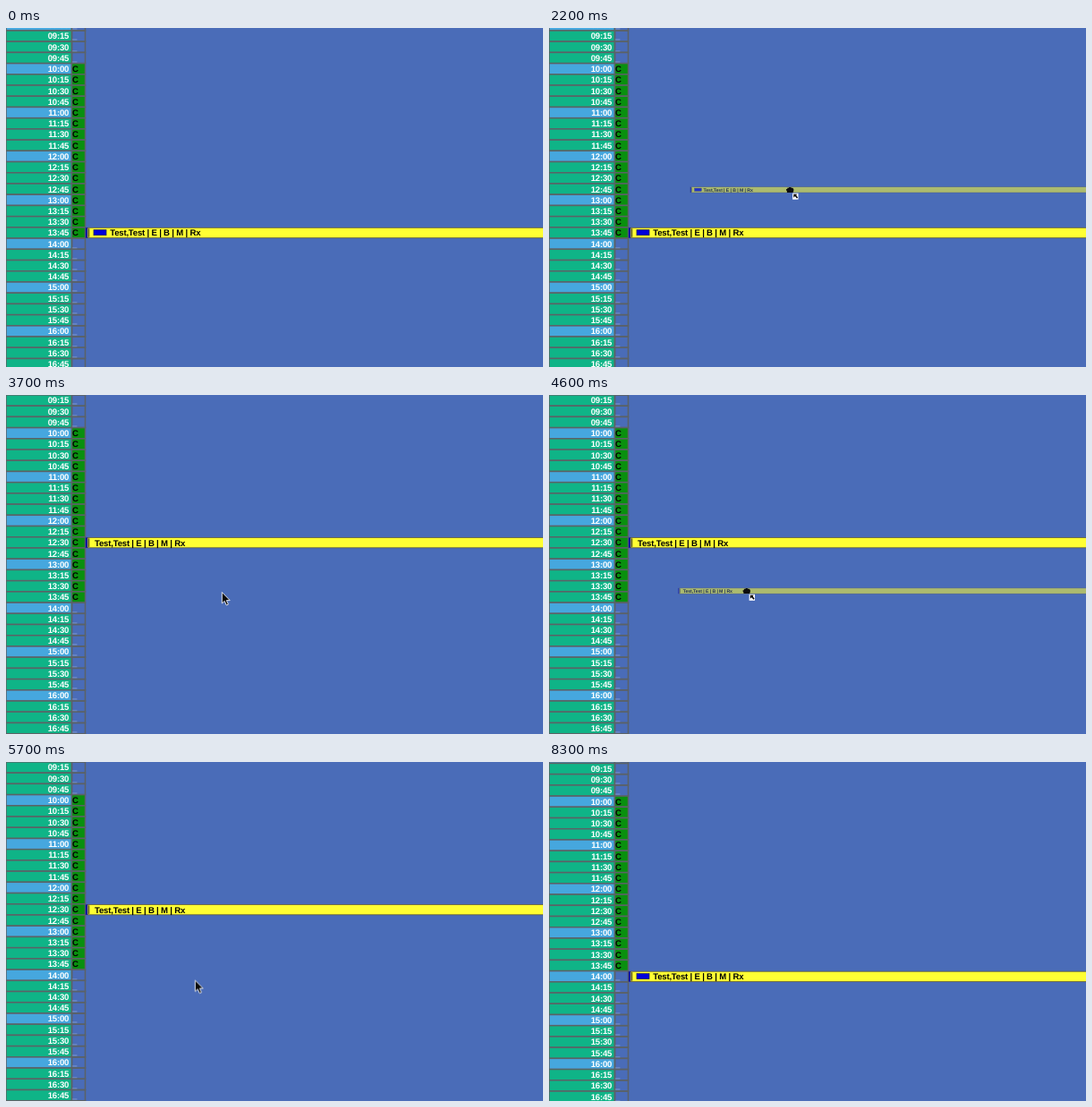
Write an HTML page that moves like this. It is 600 by 379 pixels and loops after 8400 ms.

```html
<!DOCTYPE html>
<html lang="en">
<head>
<meta charset="utf-8">
<title>Day schedule drag and drop</title>
<style>
html, body { margin: 0; width: 100%; height: 100%; overflow: hidden; background: #4a6cb8; }
svg { display: block; width: 100vw; height: 100vh; font: bold 9.6px "Liberation Sans", Arial, sans-serif; letter-spacing: -.2px; text-rendering: geometricPrecision; }
.edge { stroke: #5b6266; stroke-width: 1.5; fill: none; }
.time { fill: #fff; text-anchor: end; }

#page, #cursor, .show { animation: 8400ms linear infinite; }
#page { animation-name: reload; animation-timing-function: step-end; }
#cursor { animation-name: travel; }
.show { animation-timing-function: step-end; visibility: hidden; }

@keyframes reload {
  0% { transform: translateY(0); }
  44.04% { transform: translateY(-3px); }
  74.99%, 100% { transform: translateY(-1.5px); }
}
@keyframes travel {
  0%, 4% { transform: translate(385px, 390px); animation-timing-function: ease-out; }
  15.5%, 17.85% { transform: translate(294px, 223.5px); animation-timing-function: ease-in-out; }
  30%, 34% { transform: translate(263px, 170px); animation-timing-function: ease-in-out; }
  41%, 44.6% { transform: translate(241px, 220px); animation-timing-function: ease-in-out; }
  48%, 49% { transform: translate(229px, 165px); animation-timing-function: ease-in-out; }
  58.5%, 64% { transform: translate(217px, 244.4px); animation-timing-function: ease-in-out; }
  68%, 76.2% { transform: translate(211px, 243.5px); animation-timing-function: ease-in; }
  84.5%, 100% { transform: translate(238px, 390px); }
}
.at1345 { animation-name: first; }
.at1230 { animation-name: second; }
.at1400 { animation-name: third; }
.arrow { animation-name: point; }
.drag { animation-name: drag; }
.lift1 { animation-name: lift1; }
.lift2 { animation-name: lift2; }
.hand { animation-name: hand; }
@keyframes first { 0% { visibility: visible; } 44.04%, 100% { visibility: hidden; } }
@keyframes second { 0% { visibility: hidden; } 44.04% { visibility: visible; } 74.99%, 100% { visibility: hidden; } }
@keyframes third { 0% { visibility: hidden; } 74.99%, 100% { visibility: visible; } }
@keyframes point {
  0% { visibility: visible; } 17.85% { visibility: hidden; }
  30.94% { visibility: visible; } 48.8% { visibility: hidden; }
  63.09% { visibility: visible; } 74.99% { visibility: hidden; }
  77.37% { visibility: visible; } 85%, 100% { visibility: hidden; }
}
@keyframes drag {
  0% { visibility: hidden; } 17.85% { visibility: visible; }
  30.94% { visibility: hidden; } 48.8% { visibility: visible; }
  63.09%, 100% { visibility: hidden; }
}
@keyframes lift1 { 0% { visibility: hidden; } 17.85% { visibility: visible; } 30.94%, 100% { visibility: hidden; } }
@keyframes lift2 { 0% { visibility: hidden; } 48.8% { visibility: visible; } 63.09%, 100% { visibility: hidden; } }
@keyframes hand { 0% { visibility: hidden; } 74.99% { visibility: visible; } 77.37%, 100% { visibility: hidden; } }
</style>
</head>
<body>
<svg viewBox="0 0 600 379" preserveAspectRatio="none">
  <defs>
    <g id="strip">
      <rect x="1" y="-5.7" width="1300" height="11.4" fill="#ffff33" stroke="#5e5a3c" stroke-width=".8"/>
      <rect x="-1.2" y="-5.7" width="2.4" height="11.4" fill="#1212a0"/>
      <rect x="2.2" y="-4.8" width="1" height="9.6" fill="#333322"/>
    </g>
    <g id="plain">
      <use href="#strip"/>
      <text x="9" y="3.4">Test,Test | E | B | M | Rx</text>
    </g>
    <g id="tagged">
      <use href="#strip"/>
      <rect x="8" y="-3.3" width="14" height="6" fill="#0000dc" stroke="#22225a" stroke-width=".8"/>
      <text x="26.2" y="3.4">Test,Test | E | B | M | Rx</text>
    </g>
    <path id="fist" d="M-3.4 3V1.6L-4.2 .6V-.8H-3V-2.2H-1.6L-.8-3H.8L1.6-2.2H2.8L4-1V1.4L3.2 3Z" fill="#0c0c0c"/>
  </defs>
  <rect width="600" height="379" fill="#4a6cb8"/>
  <g id="page">
    <g id="rows"></g>
    <use class="show at1345" href="#tagged" x="90" y="229"/>
    <use class="show at1230" href="#plain" x="90" y="168.1"/>
    <use class="show at1400" href="#tagged" x="90" y="241.4"/>
  </g>
  <g id="cursor">
    <g opacity=".54">
      <use class="show lift1" href="#tagged" transform="translate(-111) scale(.545)"/>
      <use class="show lift2" href="#plain" transform="translate(-76) scale(.545)"/>
    </g>
    <path class="show arrow" d="M.3 .5V13L3.2 10.4L5.3 15L7.4 14.1L5.4 9.6H9.2Z" fill="#0a0a0a" stroke="#dfe3ea" stroke-width="1"/>
    <g class="show drag">
      <use href="#fist"/>
      <rect x="2.8" y="3.8" width="6.4" height="7" fill="#fff"/>
      <path d="M4 4.8H8L6.8 6L8.8 8.6L7.6 9.6L5.6 7.2L4 8.8Z" fill="#000"/>
    </g>
    <g class="show hand">
      <use href="#fist" transform="scale(1.15)" stroke="#c8c8a0" stroke-width=".7"/>
      <path d="M-2.6 2.4H2.4" stroke="#ddd" stroke-width=".7"/>
    </g>
  </g>
</svg>
<script>
const PITCH = 12.22, FIRST = -3.2;
const two = n => String(n).padStart(2, "0");

function row(i) {
  const hour = 9 + Math.floor(i / 4), quarter = i % 4;
  const mid = FIRST + i * PITCH, top = mid - PITCH / 2;
  const booked = hour >= 10 && hour < 14;
  const box = (x, w, fill) =>
    `<rect class="edge" x="${x}" y="${top}" width="${w}" height="${PITCH}" style="fill:${fill}"/>`;
  return box(0, 73.5, quarter ? "#0fb487" : "#46a7de") +
    box(73.5, 15, booked ? "#09900e" : "none") +
    `<text class="time" x="70.2" y="${mid + 3.4}">${two(hour)}:${two(quarter * 15)}</text>` +
    `<text x="74" y="${mid + 3.4}" fill="${booked ? "#000" : "#dde4f4"}">${booked ? "C" : "_"}</text>`;
}

document.getElementById("rows").innerHTML = Array.from({ length: 34 }, (_, i) => row(i)).join("");
</script>
</body>
</html>
```
